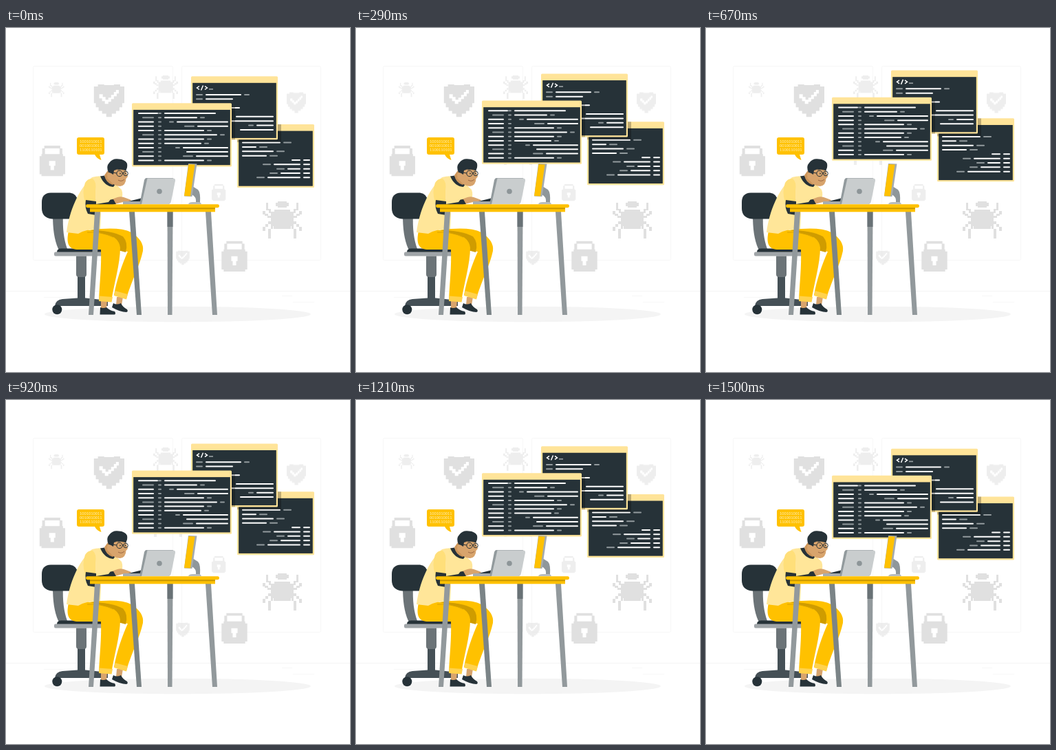
Write an HTML page that moves like this. It is 500x500 px and loops after 1540 ms.

```html
<!DOCTYPE html>
<html lang="en">
<head>
<meta charset="utf-8">
<title>Coder at desk</title>
<style>
html, body { margin: 0; width: 100%; height: 100%; overflow: hidden; background: #fff; }
svg { display: block; width: 100vw; height: 100vh; }
.bits { font: 5.6px Lato, sans-serif; fill: #fff0c2; }
.pale { opacity: .55; }
</style>
</head>
<body>
<svg viewBox="0 0 500 500">
  <defs>
    <symbol id="shield" viewBox="0 0 44 47">
      <path fill="#e0e0e0" d="M6 0H15V1H29V0H38V3H44V27H41V33H37V38H32V42H26V47H18V42H12V38H7V33H3V27H0V3H6Z"/>
      <path fill="#fff" d="M8 14h5v4h4v4h4v-3h4v-4h4v-4h3v-3h4v5h-3v4h-4v4h-4v4h-4v3h-5v-4h-4v-4h-4z"/>
    </symbol>
    <symbol id="lock" viewBox="0 0 37 44">
      <path fill="#e0e0e0" d="M7 0H30V4H33V12H29V4H8V12H4V4H7ZM3 12H34V15H37V41H34V44H3V41H0V15H3Z"/>
      <path fill="#fff" d="M14 22H23V29H21V35H16V29H14Z"/>
    </symbol>
    <symbol id="bug" viewBox="0 0 57 54">
      <g fill="#e0e0e0">
        <path d="M22 0H35V2H38V7H35V9H22V7H19V2H22ZM17 12H40V15H45V36H41V40H16V36H12V15H17Z"/>
        <path id="legs" d="M5 2h3v9h4v6h-3v-4h-4zM0 14h4v4h4v3h4v3h-5v-3h-4v-2h-3zM12 29v4h-4v4h-4v6h-4v-6h4v-4h4v-4zM12 36h3v4h-3v14h-4v-14h4z"/>
        <use href="#legs" transform="matrix(-1 0 0 1 57 0)"/>
      </g>
    </symbol>
  </defs>

  <g fill="none" stroke="#f7f7f7">
    <rect x="39.500" y="55.500" width="203" height="282" rx="2"/>
    <rect x="255.500" y="55.500" width="202" height="282" rx="2"/>
    <path stroke="#f4f4f4" d="M0 382.500H500"/>
    <path d="M401 389.500H416M417 398.500H448M55 391.500H94"/>
  </g>
  <ellipse cx="249.500" cy="416" rx="193.500" ry="11.300" fill="#f4f4f4"/>

  <use href="#shield" x="127.500" y="82" width="44.500" height="47.500"/>
  <use href="#lock" x="48.500" y="171" width="37.500" height="44.500"/>
  <use href="#lock" x="313" y="309.500" width="38" height="44.500"/>
  <use href="#bug" x="373" y="252" width="57" height="54"/>
  <g class="pale">
    <use href="#shield" x="408" y="93.500" width="28" height="29.900"/>
    <use href="#shield" x="247" y="323.500" width="20" height="21"/>
    <use href="#lock" x="299" y="227" width="20.500" height="24.400"/>
    <use href="#bug" x="207" y="145" width="57" height="54"/>
    <use href="#bug" x="214" y="69" width="36" height="34"/>
    <use href="#bug" x="62" y="79" width="22.500" height="21.300"/>
  </g>

  <g id="windows"></g>

  <!-- chair -->
  <path fill="#6b7377" d="M68 270H83C82 292 84 307 89 321H76C70 307 68 292 68 270Z"/>
  <path fill="#263238" d="M65 239.500H93Q103 241 104 251V268Q102 277.500 93 277.500H67Q52 276 52 262V253Q52 240 65 239.500Z"/>
  <path fill="#263238" d="M74 326Q74 320.500 80 320.500H142V326Z"/>
  <rect x="70" y="325.500" width="73" height="6" rx="2" fill="#a0a5a8"/>
  <rect x="104" y="355" width="11" height="41" fill="#455056"/>
  <path fill="#6b7377" d="M102 331.500H117V358Q117 362 113 362H106Q102 362 102 358Z"/>
  <path fill="#455056" d="M71 404Q72 395 82 394L104 392.500H116L148 396V404Z"/>
  <circle cx="74.300" cy="409.300" r="7" fill="#263238"/>

  <!-- legs -->
  <path fill="#d8a46c" d="M138 396H147L146 408H138ZM161 391H170L168 403H160Z"/>
  <path fill="#263238" d="M137 406Q141 408 146 406Q151 411 158 412Q160 415 158 416.500H136.500ZM156 400Q161 403 167 400Q170 406 176 409Q178 412 175 413Q166 413 154 406Z"/>
  <path fill="#ffc100" d="M120 294Q164 288 182 297Q201 309 199 324C195 344 183 366 175 393L157 388C161 366 168 345 177 325L120 318Z"/>
  <path fill="#cf9c00" d="M122 294Q153 294 170 303Q178 312 174 326L163 323Z"/>
  <path fill="#ffc100" d="M91 295C87 313 91 321 103 322H138C139 347 136 371 135 396L153 398C157 371 166 343 166 319Q164 304 146 300L118 293Z"/>
  <path fill="none" stroke="#cf9c00" stroke-width=".8" d="M118 297Q139 296 156 304"/>
  <path fill="#ffd24d" d="M135.500 389.500L155 391L153.500 398.500L135 397ZM158.500 382L177 387L175 394.500L157 389Z"/>

  <!-- body and arms -->
  <path fill="#ffe699" d="M125 217Q134 214 148 216L168 235Q171 243 167 249L136 258L138 270L137 292Q116 292 105 299L88 297C92 266 105 235 125 217Z"/>
  <path fill="#263238" d="M137 215.500Q143 230 156 231L159 227Q147 226 143 214.500Z"/>
  <path fill="#cd9559" d="M143 214L148 207L158 225L155 228Q145 225 143 214Z"/>
  <path fill="#ffdf7a" d="M126 219Q132 224 130 236L130 252L115 253Q110 239 115 225Q119 218 126 219Z"/>
  <path fill="#d8a46c" d="M151 250L162 246Q168 244 174 247L182 250Q180 253 174 252L158 256Z"/>
  <path fill="#263238" d="M116 250L131 252L156 249L160 256Q149 258 136 263L131 272L119 270Q114 261 116 250Z"/>
  <path fill="#ffe699" d="M131 250L152 249L149 253L131 256Z"/>
  <path fill="#263238" d="M178 252L196 247.500V253L187 255Z"/>

  <!-- head -->
  <path fill="#d8a46c" d="M152 204L173 203Q175 209 177 216L174.500 219Q174 229 166 230Q157 230 152 223L147 218Z"/>
  <path fill="#263238" d="M149 210Q145 201 150 196Q155 189 164 190.500Q173 191 176 197Q177 203 174 207L163 205L157 207L156 213L152 211Z"/>
  <path fill="#d8a46c" d="M154 212Q148 208 147 213Q147 219 154 219Z"/>
  <g fill="none" stroke="#263238">
    <circle cx="165" cy="211.500" r="4.200"/>
    <circle cx="174" cy="211.500" r="3.300"/>
    <path d="M155 210L161 211M169 211H171M162 206L167 205M172 206L175 207"/>
    <path stroke="#8a5638" stroke-width=".8" d="M163 221Q168 224 172 220"/>
  </g>
  <circle cx="166" cy="211.500" r=".9" fill="#263238"/>
  <circle cx="173.500" cy="211.500" r=".9" fill="#263238"/>

  <!-- monitor -->
  <path fill="#8f979a" d="M271 230L279 235Q283 239 282 254H276Q277 245 270 242Z"/>
  <path fill="#b7bcbf" d="M265 256Q266 253 271 253H281Q284 254 284 256Z"/>
  <path fill="#a4abae" d="M265 197L277.500 197.500L270.500 245L259 244.500Z"/>
  <path fill="#ffc100" d="M265.500 198L274.500 198.500L268 244.500L259 244Z"/>

  <!-- laptop -->
  <path fill="#a7adaf" d="M170 252H196V256.500H170Z"/>
  <path fill="#929a9d" d="M204 218H243L237 256H196Q194 255 195 252L201 221Q202 218 204 218Z"/>
  <path fill="#c9cdce" d="M205.500 218.500H243Q246.500 218.500 246 222L240 252Q239 256 236 256H197Z"/>
  <circle cx="223" cy="237.500" r="3.800" fill="#8d9598"/>

  <!-- desk -->
  <path fill="#92999c" d="M129 267H137L127 417H120ZM290 267H298L307 417H300Z"/>
  <path fill="#7b8487" d="M179 267H187L197 417H190Z"/>
  <path fill="#92999c" d="M234.500 267H242.500L241.500 417H235Z"/>
  <path fill="#697276" d="M234.500 267H242.500V289H234.500Z"/>
  <rect x="122" y="260" width="182" height="7.300" fill="#ffc100"/>
  <rect x="122" y="261" width="182" height="2.300" fill="#c99700"/>
  <rect x="116" y="256.300" width="194" height="4.900" rx="2.400" fill="#ffc100"/>

  <!-- speech bubble -->
  <path fill="#ffc100" d="M106 159H140Q143 159 143 162V181Q143 184 140 184H136L138.500 192Q132 190 129 184H106Q103 184 103 181V162Q103 159 106 159Z"/>
  <g class="bits">
    <text x="107" y="167">1001010011</text>
    <text x="107" y="173">0010010011</text>
    <text x="107" y="179.300">1100110101</text>
  </g>
</svg>
<script>
const CREAM = '#ffe499', DARK = '#263238', DIM = '#929a9d';
const LOOP = 1540, TOP_AT = 725, LOW = 0.6, RISE = 9.93;

const rect = (x, y, w, h, fill, extra = '') =>
  `<rect x="${x}" y="${y}" width="${w}" height="${h}" fill="${fill}" ${extra}/>`;

const pane = (x, y, w, h) =>
  rect(x, y, w, h, CREAM, 'rx="1.5"') + rect(x + 2.2, y + 9.6, w - 4.4, h - 11.9, DARK);

const shade = (x, y, w, h) => rect(x, y, w, h, '#000', 'opacity=".25"');

const bar = (y, from, to, dim) => to - from < 3 ? '' :
  `<path d="M${from + 1} ${y}H${to - 1}" stroke="${dim ? DIM : '#fff'}" stroke-width="2" stroke-linecap="round"/>`;

// Each row is a white run and a short grey one, set from the left or against the right edge.
const code = o => o.lengths.map((len, row) => {
  const y = o.y + row * o.pitch;
  const dim = o.dim(row), gap = dim && 4;
  const side = o.side ? o.side(row, y) : '';
  if (!len) return side;
  if (o.toEnd(row)) {
    const from = o.end - len;
    return side + bar(y, from, from + dim, true) + bar(y, from + dim + gap, o.end);
  }
  const to = o.x + len;
  return side + bar(y, o.x, to - dim - gap) + bar(y, to - dim, to, true);
}).join('');

const right = code({
  x: 343, end: 428, y: 166.6, pitch: 6.34,
  lengths: [72, 37, 62, 52, 13, 55, 35, 45, 64],
  toEnd: row => row > 3,
  dim: row => row === 4 ? 0 : 12,
  side: (row, y) => row > 3 ? bar(y, 432, 442) : ''
});

const back = code({
  x: 290, end: 389, y: 97, pitch: 6.36,
  lengths: [64, 40, 0, 50, 0, 55, 90, 37, 49],
  toEnd: row => row > 4,
  dim: row => row % 7 ? 0 : 8,
  side: (row, y) => row < 2 ? bar(y, 276, 286, true) : ''
});

const front = code({
  x: 230, end: 323, y: 124.1, pitch: 6.22,
  lengths: [75, 59, 86, 64, 69, 88, 69, 65, 77, 61, 66, 69],
  toEnd: row => row % 6 === 2 || row % 6 === 3 || row === 10,
  dim: row => row % 9 ? (row % 7 === 3 ? 15 : 7) : 0,
  side: (row, y) => {
    const dim = row % 4 === 1;
    return bar(y, dim ? 198 : 192, row ? 215 : 221, dim) + bar(y, 221, 226, true);
  }
});

const windows = document.getElementById('windows');
windows.innerHTML =
  pane(336, 140, 112, 92) + right + shade(336, 140, 64, 26) +
  pane(269, 70.2, 126, 92) + back +
  '<path d="M281 84.500L277.500 87L281 89.500M289 84.500L292.500 87L289 89.500M286.500 83.500L283.500 90.500" fill="none" stroke="#fff" stroke-width="1.500"/>' +
  rect(295, 88, 6, 1.7, DIM) + shade(328, 114, 5, 48.2) +
  pane(183, 109.3, 145, 92.2) + front;

// Steady drift: up to the top at TOP_AT, then back down.
function draw(ms) {
  const phase = ((ms - TOP_AT + LOOP) % LOOP) / LOOP;
  const height = Math.abs(2 * phase - 1);
  windows.setAttribute('transform', `translate(0 ${(LOW - RISE * height).toFixed(2)})`);
}

const start = performance.now();
function tick(now) {
  draw(Math.max(0, now - start) % LOOP);
  requestAnimationFrame(tick);
}
draw(0);
requestAnimationFrame(tick);
</script>
</body>
</html>
```
